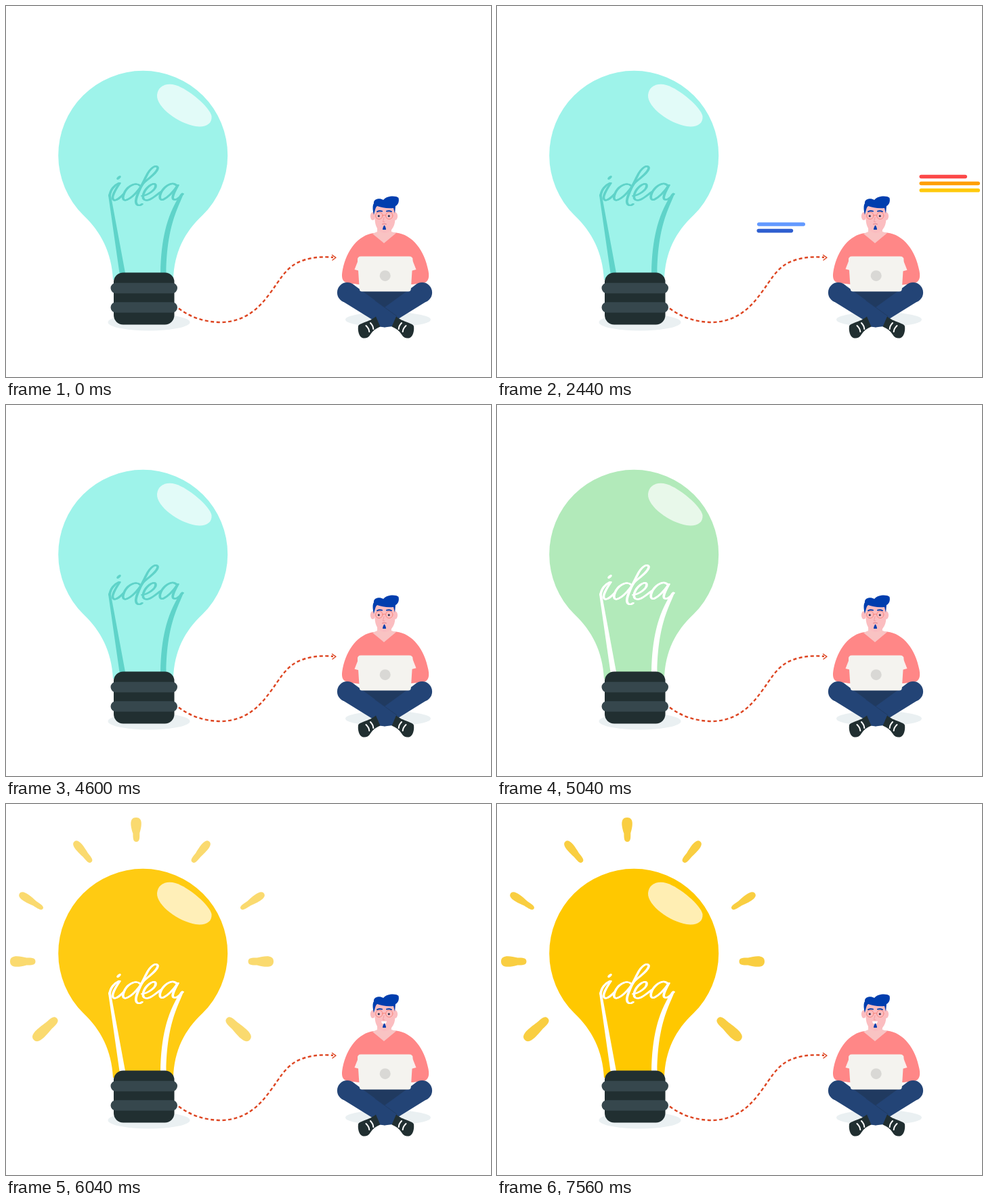
Recreate the animation shown at these times as an HTML page with a canvas. Size 716 by 549 pixels, loop 8 s.

```html
<!DOCTYPE html>
<html lang="en">
<head>
<meta charset="utf-8">
<title>Idea</title>
<style>
html, body { margin: 0; width: 100%; height: 100%; overflow: hidden; background: #fff; }
canvas { display: block; width: 716px; height: 549px; }
</style>
</head>
<body>
<canvas id="stage"></canvas>
<script>
const W = 716, H = 549, LOOP = 8000, STEP = 40;
const canvas = document.getElementById('stage');
const ctx = canvas.getContext('2d');
const dpr = window.devicePixelRatio || 1;
canvas.width = W * dpr;
canvas.height = H * dpr;

const DARK = '#212f31', NAVY = '#234476', BLUE = '#003eae', SHADOW = '#eaf0f2';
const SKIN = '#fbbdc0', NECK = '#f9c3c3', SHIRT = '#ff8787';
const TEAL = [158, 243, 234], YELLOW = [255, 200, 0];
const THREAD = [95, 211, 201], WHITE = [255, 255, 255];

const ramp = (t, a, b) => Math.min(1, Math.max(0, (t - a) / (b - a)));
const mix = (a, b, k) => `rgb(${a.map((v, i) => Math.round(v + (b[i] - v) * k)).join()})`;

function fill(path, color) {
  ctx.fillStyle = color;
  ctx.fill(new Path2D(path));
}

function line(path, color, width) {
  ctx.strokeStyle = color;
  ctx.lineWidth = width;
  ctx.stroke(new Path2D(path));
}

function oval(x, y, rx, ry, color, turn = 0) {
  ctx.fillStyle = color;
  ctx.beginPath();
  ctx.ellipse(x, y, rx, ry, turn, 0, Math.PI * 2);
  ctx.fill();
}

function pill(x, y, w, h, r, color) {
  ctx.fillStyle = color;
  ctx.beginPath();
  ctx.roundRect(x, y, w, h, r);
  ctx.fill();
}

// Draws the same thing mirrored around a vertical axis.
function mirror(axis, draw) {
  ctx.save();
  ctx.translate(axis * 2, 0);
  ctx.scale(-1, 1);
  draw();
  ctx.restore();
}

// A drop from its narrow inner end to its wide outer end.
function ray(x1, y1, x2, y2, w1, w2) {
  const len = Math.hypot(x2 - x1, y2 - y1);
  const a = w1 * 0.58, b = w2 * 0.62;
  ctx.save();
  ctx.translate(x1, y1);
  ctx.rotate(Math.atan2(y2 - y1, x2 - x1));
  fill(`M0 0C0 ${-a} ${len * 0.15} ${-a} ${len * 0.35} ${-a}` +
    `C${len * 0.65} ${-b} ${len} ${-b * 1.25} ${len} 0` +
    `C${len} ${b * 1.25} ${len * 0.65} ${b} ${len * 0.35} ${a}` +
    `C${len * 0.15} ${a} 0 ${a} 0 0Z`, '#f9ce41');
  ctx.restore();
}

function sideRays() {
  ray(126, 86, 101, 55.5, 8, 10);
  ray(54.5, 155, 20, 132.5, 7, 10);
  ray(43.5, 233, 6, 233, 9.5, 13.5);
  ray(75, 317, 41, 349, 11, 13);
}

function rays(alpha) {
  if (alpha <= 0) return;
  ctx.globalAlpha = alpha;
  ray(192.5, 56, 192, 20, 8.5, 13.5);
  sideRays();
  mirror(200.5, sideRays);
  ctx.globalAlpha = 1;
}

// A broad nib: upright strokes come out thicker than level ones.
function pen(path, color) {
  for (const shift of [-0.8, 0, 0.8]) {
    ctx.save();
    ctx.translate(shift, 0);
    line(path, color, 2.1);
    ctx.restore();
  }
}

function lettering(color) {
  fill('M151 280C152 276 155 277 155.5 284L176 395H167.5Z', color);
  fill('M261.5 279C256 296 237.5 322 236.5 395H228C229 345 237 312 256 281C258 276 262.5 275 261.5 279Z', color);
  oval(166.5, 254, 3.8, 2, color, -0.7);
  pen('M153 281C154 272 160 265 167 262', color);
  pen('M168 262C162 271 154 284 159 287C163 289 169 283 174 278', color);
  pen('M198 266C192 260 181 266 176 274C171 283 172 289 178 287C186 284 195 274 203 262', color);
  pen('M203 262C212 254 225 245 224 239C222 234 213 239 207 252C200 266 190 284 192 291C193 296 198 296 201 293', color);
  pen('M201 281C209 280 222 272 221 265C218 259 206 269 203 278C200 288 207 289 213 286C219 283 224 278 229 275', color);
  pen('M252 266C247 259 236 265 230 274C225 283 227 289 233 286C241 282 249 272 254 265C249 274 244 283 247 286C251 288 257 283 261 278', color);
}

function bulb(t) {
  const lit = ramp(t, 4942, 5422);
  const pulse = (1 - Math.cos(ramp(t, 5440, 7580) * Math.PI * 2)) / 2;
  oval(211, 468, 60.5, 12.5, SHADOW);
  rays(ramp(t, 5080, 5455) * (1 - 0.41 * pulse));

  ctx.globalAlpha = 1 - 0.12 * pulse;
  fill('M114.2 309.6A125 125 0 1 1 290.2 309.6C264 334 248 365 247 405H158C156 365 140 334 114.2 309.6Z',
    mix(TEAL, YELLOW, lit));
  ctx.globalAlpha = 0.7;
  fill('M223 132C224 119 236 113 250 117C270 123 301 150 303.5 163C304.5 175 294 180 280 178C255 174 222 150 223 132Z', '#fff');
  ctx.globalAlpha = 1;

  lettering(mix(THREAD, WHITE, ramp(t, 4920, 5000)));
  pill(159, 394.5, 89.5, 77, 14, DARK);
  pill(154.5, 409.7, 98.5, 15.5, 7.75, '#36474d');
  pill(154.5, 438.2, 98.5, 15.5, 7.75, '#36474d');
}

function arrow() {
  ctx.lineCap = 'butt';
  ctx.setLineDash([5, 3.6]);
  line('M255 447.5C273 461 294 468 318 468C352 467 372 449 389 426C404 406 411 391 428 381C443 373 462 370 483 372', '#dd4420', 2.4);
  ctx.setLineDash([]);
  ctx.lineCap = 'round';
  line('M481.5 368.5L487 372.3L482 376', '#dd4420', 1.4);
}

// x, y, width, colour, start, end
const BARS = [
  [623.5, 249.7, 70.5, '#fc4848', 360, 800],
  [623.5, 259.7, 89.5, '#ff9f04', 920, 1400],
  [623.5, 269.9, 89.5, '#ffc90a', 1280, 1680],
  [384, 320.2, 71, '#6299ff', 1720, 2160],
  [383.5, 329.8, 70.5, '#2f5fd0', 2120, 2540],
  [383.5, 339.6, 89.5, '#ff8787', 2520, 2940],
  [383.5, 349.2, 89.5, NAVY, 2900, 3340]
];

function bars(t) {
  ctx.globalAlpha = 1 - ramp(t, 3840, 4160);
  for (const [x, y, w, color, a, b] of BARS) {
    const len = w * ramp(t, a, b);
    if (len > 0) pill(x, y, len, 5.6, Math.min(2.8, len / 2), color);
  }
  ctx.globalAlpha = 1;
}

function head(t) {
  oval(541.5, 311, 3.6, 6, SKIN);
  oval(574.5, 311, 3.6, 6, SKIN);
  fill('M548 322H569V334L576 336L558 351L541 337L548 334Z', NECK);
  fill('M544.5 294H574.5V316C574 328 567 336 559 336C551 336 545 328 544.5 316Z', SKIN);
  fill('M543 309C541 301 541 295 543 292C542 286 551 283 557 287C562 281 575 280 579.5 284C581 290 578 295 575 296L574 307L572 299C562 300 554 298 548 296C545 298 545 303 543 309Z', BLUE);
  line('M548 304.3Q551 302.4 555 303.7M562 303.7Q566 302.4 569 304.3', BLUE, 1.9);

  const since = t % 800;
  const shut = t < 4620 && since > 440 && since < 600;
  for (const x of [550.8, 565.8]) {
    if (shut) {
      line(`M${x - 2.5} 311Q${x} 312.5 ${x + 2.5} 311`, '#e58e92', 0.9);
    } else {
      oval(x - 0.5, 310.7, 1.5, 1.5, '#22304d');
    }
    ctx.strokeStyle = '#f77b70';
    ctx.lineWidth = 0.8;
    ctx.beginPath();
    ctx.arc(x, 310.3, 5.2, 0, Math.PI * 2);
    ctx.stroke();
  }
  line('M556 310Q558.3 308.5 560.6 310', '#f77b70', 0.8);
  line('M558 313L556.5 319.5H559', '#f09498', 0.8);

  const smile = ramp(t, 5440, 5600);
  ctx.globalAlpha = 1 - smile;
  line('M555.5 322.8Q558.5 321.5 561.5 322.8', '#d9737c', 0.9);
  ctx.globalAlpha = smile;
  fill('M554 321.5H562Q561.5 325.5 558 325.5Q554.5 325.5 554 321.5Z', '#fff');
  ctx.globalAlpha = 1;
  fill('M558.6 324.2C560 326 561 328.5 561 331H556C556 328.5 557 326 558.6 324.2Z', BLUE);
}

function sleeve(lift) {
  ctx.save();
  ctx.translate(0, lift);
  fill('M502 397L522 391V412L507 410Q499 408 502 397Z', SHIRT);
  fill('M514.5 390L520 376L522 392Z', '#fbeeec');
  ctx.restore();
}

function leg() {
  oval(503.7, 424, 14.8, 15, NAVY);
  fill('M511.5 411.3L577 459L570.5 474L559 475.5L495 435.8Z', NAVY);
}

function shoe() {
  fill('M546 459.5L552.5 474.5C546 477 541 481 538 486C535 491 531 492 527 491.5C521 490 519 480 520 474C521 469 536 468 546 459.5Z', DARK);
  line('M531.5 473Q535.8 477 536.3 482M538 469Q542 473 542.3 478', '#fff', 2);
}

function man(t) {
  oval(564, 464, 63, 11, SHADOW);
  fill('M543 336C520 339 503 361 497 390C494 405 498 409 506 410L523 412H598L614 410C622 410 626 404 623.5 392C618 362 600 338 576 335.5Z', SHIRT);
  head(t);

  const beat = t < 4620 ? Math.sin(t / 160 * Math.PI) : 0;
  sleeve(beat);
  mirror(560, () => sleeve(-beat));

  fill('M514 420H604L560 450Z', '#203a60');
  mirror(559, leg);
  leg();
  line('M545 436L577 459', '#203a60', 0.8);
  shoe();
  mirror(561, shoe);

  fill('M524 370.5H595Q601 370.5 600.5 376L597.8 419Q597.5 422.5 594 422.5H525.5Q522 422.5 521.8 419L519 376Q518.5 370.5 524 370.5Z', '#f4f3ef');
  oval(559.7, 399.2, 8, 8, '#d9d8d5');
}

function draw(now) {
  const t = Math.floor((now % LOOP) / STEP) * STEP;
  ctx.setTransform(dpr, 0, 0, dpr, 0, 0);
  ctx.fillStyle = '#fff';
  ctx.fillRect(0, 0, W, H);
  ctx.lineCap = ctx.lineJoin = 'round';
  bulb(t);
  arrow();
  bars(t);
  man(t);
}

const start = performance.now();
function tick() {
  draw(performance.now() - start);
  requestAnimationFrame(tick);
}
tick();
</script>
</body>
</html>
```
